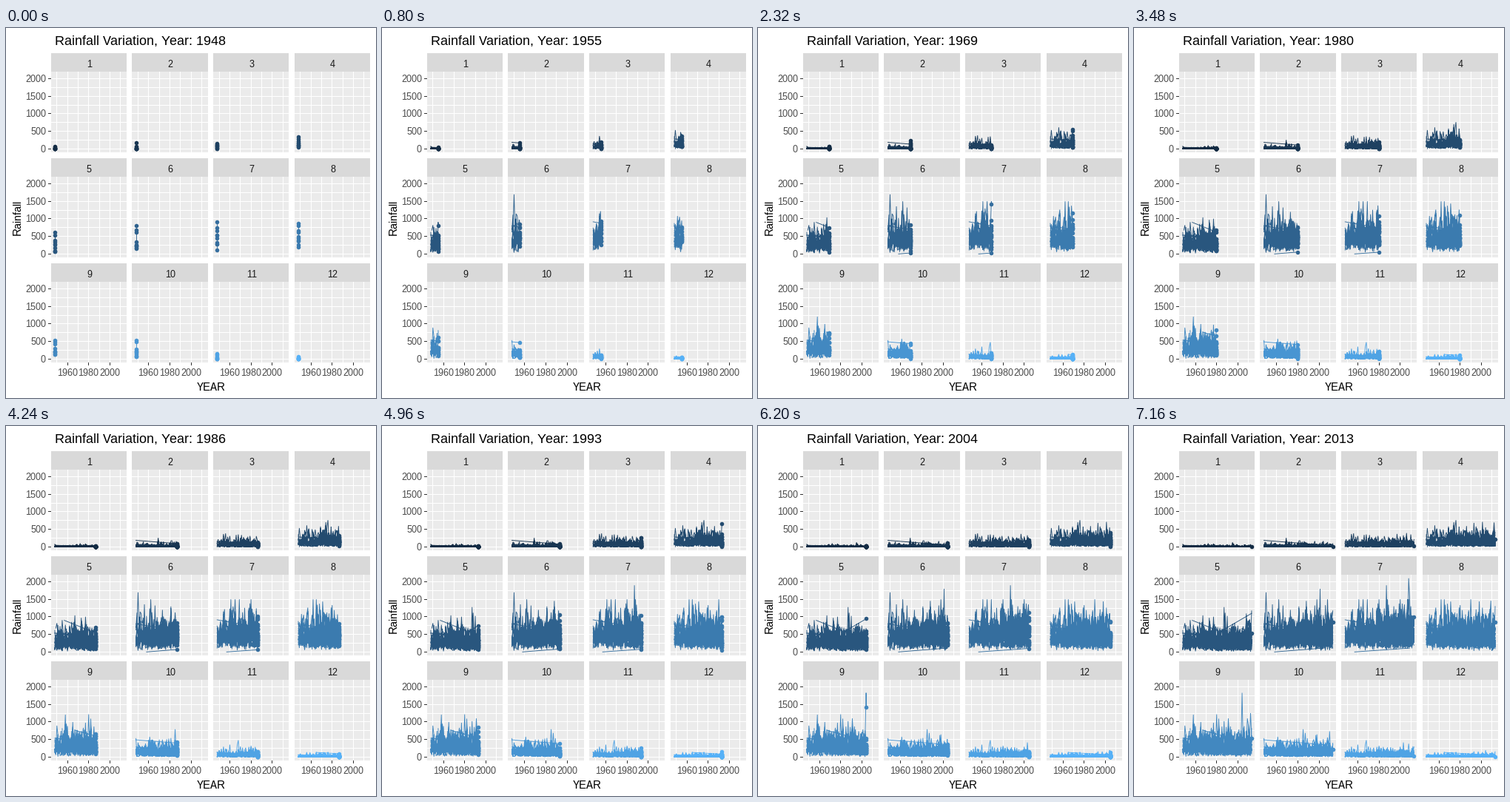
A matplotlib script for the animation above (8000 ms loop, 500 px wide and 500 px high).

```python
import numpy as np
import matplotlib
import matplotlib.pyplot as plt
from matplotlib.animation import FuncAnimation
from matplotlib.collections import LineCollection
from matplotlib.patches import Rectangle

matplotlib.rcParams.update({
    "font.family": "Liberation Sans",
    "text.hinting": "native",
    "text.hinting_factor": 1,
})

SIZE, DPI = 500, 100
PX = 72 / DPI
FRAMES, MOVING, STEP = 200, 180, 40
FIRST, LAST = 1948, 2013
YEARS = np.arange(FIRST, LAST + 1)
MONTHS = range(1, 13)
STATIONS, EARLY = 28, 9

# Panel layout in pixels, y pointing down
LEFT, PITCH_X, WIDTH = 61.24, 109.69, 102.36
TOP, PITCH_Y, HEIGHT, STRIP = 59, 142, 109, 25
X_SCALE = WIDTH / 71.5
Y_SCALE = 0.0474

# Extreme readings: month, year, value
RECORDS = [(6, 1950, 1700), (6, 2001, 1800), (7, 1987, 1900),
           (7, 2008, 2100), (9, 2004, 1830)]

# Gaps in a record, bridged by a straight line: month, year, value, year, value
BRIDGES = [(2, 1948, 185, 2004, 50), (5, 1957, 900, 1990, 500),
           (5, 1984, 590, 2013, 1100), (6, 1958, 0, 2004, 110),
           (7, 1957, 0, 2009, 110), (9, 1967, 760, 1990, 570),
           (10, 1948, 490, 2006, 350), (12, 1965, 130, 2006, 60)]


def shade(month):
    """Blue gradient through its dark, middle and light stops."""
    t = (month - 1) / 11
    dark, middle, light = (np.array([int(c[i:i + 2], 16) for i in (0, 2, 4)])
                           for c in ("132B43", "326896", "56B1F7"))
    mix = (dark * (1 - t) * (1 - 2 * t) + middle * 4 * t * (1 - t)
           + light * t * (2 * t - 1))
    return tuple(mix / 255)


def corner(month):
    row, col = divmod(month - 1, 4)
    return LEFT + PITCH_X * col, TOP + PITCH_Y * row


def to_x(left, year):
    return left + (year - 1944.75) * X_SCALE


def to_y(top, value):
    return top + 104.3 - value * Y_SCALE


def bridge(y0, v0, y1, v1):
    return np.interp(YEARS, (y0, y1), (v0, v1), left=np.nan, right=np.nan)


def readings(month, rng):
    """Rows of yearly rainfall, one per station, NaN where there is none."""
    season = np.exp(-((month - 7) / 2.65) ** 2)  # the rains peak in July
    mean = 6 + 515 * season
    shape = 0.35 + 3.2 * season ** 0.7
    rain = rng.gamma(shape, mean / shape, (STATIONS, len(YEARS)))
    rain = np.minimum(rain, 1500)
    for i in range(EARLY, STATIONS):
        rain[i, :2 * (i - EARLY) + 1] = np.nan
    for i, (m, year, value) in enumerate(RECORDS):
        if m == month:
            rain[i, year - FIRST] = value
    rain[0, -1] = max(0, 2.1 * mean - 100)
    lines = [bridge(FIRST, 1.7 * mean + 30, 1982, 1.4 * mean)]
    lines += [bridge(*ends) for m, *ends in BRIDGES if m == month]
    return np.vstack([rain, lines])


fig = plt.figure(figsize=(SIZE / DPI, SIZE / DPI), dpi=DPI, facecolor="white")
ax = fig.add_axes([0, 0, 1, 1])
ax.set(xlim=(0, SIZE), ylim=(SIZE, 0))
ax.axis("off")


def label(x, y, text, size, color="black", ha="center", **kw):
    return ax.text(x, y, text, fontsize=size * PX, color=color, ha=ha,
                   va="baseline", **kw)


def box(x0, y0, x1, y1, color):
    ax.add_patch(Rectangle((x0, y0), x1 - x0, y1 - y0, fc=color, lw=0,
                           antialiased=False, zorder=0))


def strokes(segments, color):
    ax.add_collection(LineCollection(segments, colors=color, linewidths=PX,
                                     snap=False, capstyle="butt", zorder=1))


def pixel(v):
    """Centre of the pixel that holds v."""
    return np.floor(v) + 0.5


grid, ticks = [], []
for month in MONTHS:
    left, top = corner(month)
    x0, x1 = int(left), int(left + WIDTH)
    bottom = top + HEIGHT
    box(x0, top - STRIP, x1, top, "#D9D9D9")
    box(x0, top, x1, bottom, "#EBEBEB")
    label(left + WIDTH / 2, top - 6, str(month), 12.5, "#1A1A1A")
    for year in range(1950, 2011, 10):
        x = pixel(to_x(left, year))
        grid.append([(x, top), (x, bottom)])
        if month > 8 and year % 20 == 0:
            ticks.append([(x, bottom), (x, bottom + 4)])
            label(x - 0.5, 470, str(year), 12.5, "#4D4D4D")
    for value in range(0, 2001, 250):
        y = pixel(to_y(top, value))
        grid.append([(x0, y), (x1, y)])
        if month % 4 == 1 and value % 500 == 0:
            ticks.append([(57, y), (61, y)])
            label(54, y + 4.5, str(value), 12.5, "#4D4D4D", ha="right")
strokes(grid, "white")
strokes(ticks, "#333333")

label(277, 490, "YEAR", 15)
label(20, 256, "Rainfall", 15, rotation=90, rotation_mode="anchor")
title = label(66, 23, "", 18, ha="left")

rng = np.random.default_rng(7)
panels = []
for month in MONTHS:
    left, top = corner(month)
    color = shade(month)
    line, = ax.plot([], [], color=color, lw=0.9 * PX, zorder=2,
                    solid_joinstyle="bevel")
    dots, = ax.plot([], [], "o", color=color, ms=4, mew=0, zorder=3)
    panels.append((left, to_y(top, readings(month, rng)), line, dots))


def draw(frame):
    step = min(frame, MOVING - 1)
    span = (LAST - FIRST) * step / (MOVING - 1)
    n = min(int(span), LAST - FIRST - 1)
    part = span - n
    title.set_text(f"Rainfall Variation, Year: {round(FIRST + span)}")
    for left, ys, line, dots in panels:
        tip_x = to_x(left, FIRST + span)
        if step == 0:
            tip = ys[:, 0]
            line.set_data([tip_x] * 2, [np.nanmin(tip), np.nanmax(tip)])
        else:
            tip = ys[:, n] * (1 - part) + ys[:, n + 1] * part
            xs = np.append(to_x(left, YEARS[:n + 1]), [tip_x, np.nan])
            gap = np.full(len(ys), np.nan)
            path = np.column_stack([ys[:, :n + 1], tip, gap])
            line.set_data(np.tile(xs, len(ys)), path.ravel())
        if step == MOVING - 1:
            tip = tip[:1]
        dots.set_data(np.full(len(tip), tip_x), tip)
    return []


anim = FuncAnimation(fig, draw, frames=FRAMES, interval=STEP,
                     init_func=lambda: [], repeat=True, repeat_delay=0)
plt.show()
```
